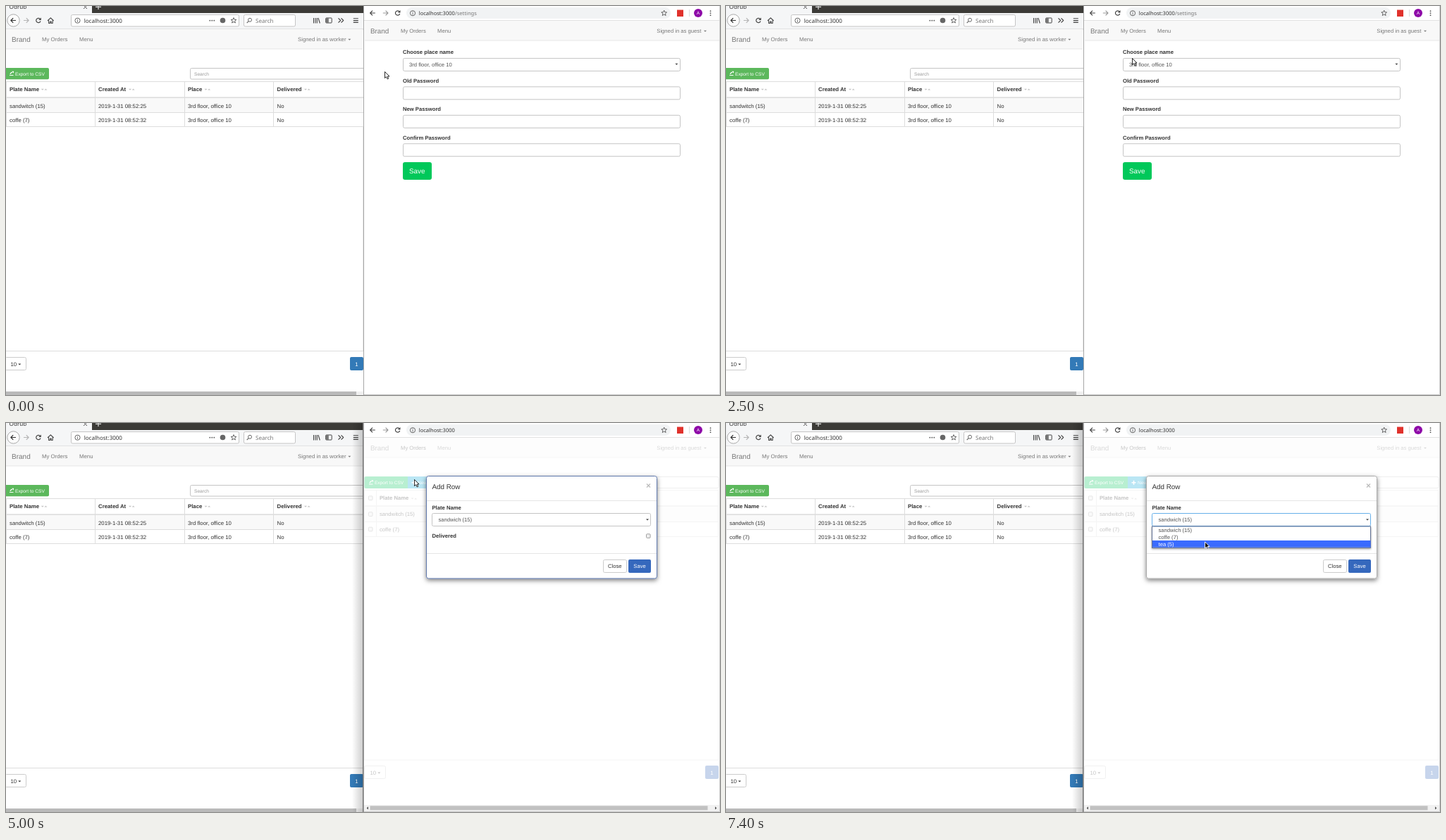
Write an HTML page that moves like this. It is 1013 by 553 pixels and loops after 8 s.

```html
<!DOCTYPE html>
<html lang="en">
<head>
<meta charset="utf-8">
<title>Orders</title>
<style>
html, body { margin: 0; width: 100%; height: 100%; overflow: hidden; background: #fff; }
svg { display: block; width: 100vw; height: 100vh; }
text { font-family: "Liberation Sans", Arial, sans-serif; text-rendering: geometricPrecision; white-space: pre; }
.ui { font-family: "Noto Sans", "Open Sans", sans-serif; }
.b { font-weight: bold; }
</style>
</head>
<body>
<svg id="stage" viewBox="0 0 1013 553" preserveAspectRatio="none"></svg>
<script>
const LEFT = 7.8, RIGHT = 7.66, SMALL = 6.6, BIG = 9.85;
const INK = '#333', MUTED = '#777', LINE = '#ddd', FIELD = '#c4c4c4';

const text = (x, y, s, size, fill = INK, cls = '') =>
  `<text x="${x}" y="${y}" font-size="${size}" fill="${fill}" class="${cls}">${s}</text>`;
const rect = (x, y, w, h, fill, stroke = 'none', r = 0) =>
  `<rect x="${x}" y="${y}" width="${w}" height="${h}" rx="${r}" fill="${fill}" stroke="${stroke}"/>`;
const path = (d, stroke, width = 1, fill = 'none') =>
  `<path d="${d}" stroke="${stroke}" stroke-width="${width}" fill="${fill}" stroke-linejoin="round"/>`;
const circle = (x, y, r, fill, stroke = 'none') =>
  `<circle cx="${x}" cy="${y}" r="${r}" fill="${fill}" stroke="${stroke}"/>`;
const hline = (x1, x2, y, color = LINE) => rect(x1, y, x2 - x1, 1, color);
const vline = (x, y1, y2, color = LINE) => rect(x, y1, 1, y2 - y1, color);
const group = (id, body, attrs = '') => `<g id="${id}" ${attrs}>${body}</g>`;

const caret = (x, y, color, w = 4) => path(`M${x} ${y}h${w}l${-w / 2} ${w / 2}z`, 'none', 0, color);
const sorter = (x, y) => caret(x, y - .6, '#c4c4c4') + path(`M${x + 4.6} ${y + 1.2}h4l-2 -2z`, 'none', 0, '#c4c4c4');
const field = (x, y, w, h) => rect(x, y, w, h, '#fff', FIELD, 2);
const checkbox = (x, y) => rect(x - 2.8, y - 2.8, 5.6, 5.6, '#eee', '#a2a2a2', 1);
const dots = (x, y, dx, dy, color) =>
  [-1, 0, 1].map(i => circle(x + i * dx, y + i * dy, .9, color)).join('');
const info = (x, y) => circle(x, y, 3.6, 'none', '#666') +
  path(`M${x} ${y - .5}v2.6M${x} ${y - 2.2}v1`, '#666', .9);
const arrow = (x, y, dir, color) =>
  path(`M${x - 3.5} ${y}h7M${x + dir * .3} ${y - 3.3}l${dir * 3.3} 3.3l${-dir * 3.3} 3.3`, color, 1.2);
const reload = (x, y, color) =>
  path(`M${x + 3} ${y + 1}a3.2 3.2 0 1 1 -.7 -3.2`, color, 1.2) +
  path(`M${x + 3.8} ${y - 4}v3.6h-3.6z`, 'none', 0, color);
const star = (x, y) => {
  const pts = Array.from({ length: 10 }, (_, i) => {
    const a = Math.PI * (i / 5 - .5), r = i % 2 ? 1.8 : 4.1;
    return `${(x + r * Math.cos(a)).toFixed(2)} ${(y + r * Math.sin(a)).toFixed(2)}`;
  });
  return path(`M${pts.join('L')}z`, '#555', .9);
};
const exportIcon = (x, y) =>
  path(`M${x} ${y + 2.3}h5.5M${x + 1} ${y + .8}q.6 -2.6 3 -2.6`, '#fff', 1.1) +
  path(`M${x + 3.3} ${y - 3.4}h2.7v2.9z`, 'none', 0, '#fff');
const pager = (x, y, end, color) =>
  rect(x - 1.5, y + .5, 30, 18, '#fff', '#ccc', 2) + text(x + 6.5, y + 12.6, '10', LEFT) +
  caret(x + 17.3, y + 9.4, INK) + rect(end - 19, y, 19, 19, color, 'none', 2) +
  text(end - 11.8, y + 12.6, '1', LEFT, '#fff');

function navBar(x, y, size, orders, menu, user, userX, caretX, bold) {
  const base = y + 17.2;
  return rect(x, y, 506, 28, '#f8f8f8') + hline(x, x + 506, y + 27.5, '#e7e7e7') +
    text(x + 8, base + .8, 'Brand', size * 1.286, MUTED) +
    text(orders, base, 'My Orders', size, bold || MUTED) + text(menu, base, 'Menu', size, MUTED) +
    text(userX, base, 'Signed in as ' + user, size, MUTED) + caret(caretX, base - 3.4, MUTED);
}

function leftWindow() {
  const cols = [5, 131, 258, 384.5];
  const heads = ['Plate Name', 'Created At', 'Place', 'Delivered'];
  const sorts = [49.8, 174, 281.5, 423];
  const rows = [['sandwitch (15)', '2019-1-31 08:52:25'], ['coffe (7)', '2019-1-31 08:52:32']];
  let s = rect(0, 0, 507, 553, '#fff') + rect(0, 0, 507, 10, '#3c3b37') +
    rect(0, 0, 122, 10, '#f5f6f7') + text(4.5, 4.3, 'Odrub', 8.2, INK, 'ui') +
    path('M110 -1l5 5m0 -5l-5 5', '#555', 1) + path('M127 1.3h8M131 -2v7', '#ddd', 1.2) +
    rect(0, 10, 507, 23, '#f5f6f7') + hline(0, 507, 32.5, '#d0d0d0');
  s += circle(10.5, 20.5, 8.7, '#fbfbfb', '#aaa') + arrow(10.5, 20.5, -1, '#333') +
    arrow(28.5, 20.5, 1, '#b5b5b5') + reload(46, 20.5, '#444') +
    path('M59 21l4.3 -4.2l4.3 4.2M60.6 20.5v4h2v-2.5h1.5v2.5h2v-4', '#444', 1.1) +
    rect(92.5, 12.5, 238, 16.5, '#fff', '#c5c5c5', 2) + info(101.5, 20.7) +
    text(110.7, 23.7, 'localhost:3000', 8, INK, 'ui') + dots(292.3, 20.7, 3, 0, '#555') +
    circle(307.5, 20.5, 3.8, '#666') + star(323, 20.7) +
    rect(337.5, 12.5, 73, 16.5, '#fff', '#c5c5c5', 2) + circle(346, 19.8, 2.5, 'none', '#666') +
    path('M344.2 21.6l-2.5 2.6', '#666', 1.2) + text(354, 23.7, 'Search', 8.1, MUTED, 'ui') +
    path('M436.5 17v7.5M439 17v7.5M441.3 17v7.5M443 17l2.3 7.5', '#444', 1.1) +
    rect(453.7, 17, 8.5, 7, 'none', '#444', 1) + rect(454, 17, 3.8, 7, '#777') +
    path('M471.5 17.3l3.2 3.2l-3.2 3.2m4 -6.4l3.2 3.2l-3.2 3.2', '#444', 1.2) +
    path('M492.8 17.8h7M492.8 20.6h7M492.8 23.4h7', '#444', 1.1);
  s += navBar(0, 33, LEFT, 51, 104, 'worker', 414, 485.3);
  s += rect(-3, 88, 64, 16.3, '#5cb85c', 'none', 2) + exportIcon(5, 96.2) +
    text(13, 98.8, 'Export to CSV', SMALL, '#fff') +
    rect(261.5, 88.5, 248, 15.5, '#fff', FIELD, 2) + text(267, 98.8, 'Search', SMALL, '#999');
  s += rect(0, 131, 507, 20, '#f9f9f9') + hline(0, 507, 107, LINE) + rect(0, 129.3, 507, 1.6, LINE) +
    hline(0, 507, 151) + hline(0, 507, 171) + vline(0, 107, 172) +
    [126, 253, 379].map(x => vline(x, 107, 172)).join('');
  heads.forEach((h, i) => s += text(cols[i], 120.7, h, LEFT, INK, 'b') + sorter(sorts[i], 118.4));
  rows.forEach((r, j) => [...r, '3rd floor, office 10', 'No'].forEach((c, i) =>
    s += text(cols[i], 144.7 + j * 20.2, c, LEFT)));
  s += hline(0, 507, 490) + vline(506, 171, 490, '#e6e6e6') + pager(0, 499, 507, '#337ab7') +
    rect(0, 548, 507, 5, '#f0f0f0') + rect(0, 548, 497, 5, '#bababa');
  return s;
}

function rightChrome() {
  return rect(508, 0, 505, 553, '#fff') + arrow(520.3, 10, -1, '#444') + arrow(538.3, 10, 1, '#999') +
    reload(555.7, 10, '#444') + rect(568, 2, 375, 16, '#f1f3f4', 'none', 8) + info(577, 10.2) +
    text(585.7, 12.9, 'localhost:3000<tspan id="route" fill="#777">/settings</tspan>', 7.55, INK, 'ui') +
    star(933.7, 10.2) + rect(952, 5.5, 9, 9.5, '#e0322c') + vline(969, 5, 15, '#ddd') +
    circle(982, 10, 6, '#8e0aa8') + text(979.9, 12.2, 'A', 6.2, '#fff') + dots(999.5, 10.2, 0, 3, '#555') +
    hline(508, 1013, 20, '#e2e2e2');
}

function settingsPage() {
  let s = navBar(509, 21, RIGHT, 560, 612, 'guest', 923.3, 990);
  ['Choose place name', 'Old Password', 'New Password', 'Confirm Password'].forEach((label, i) => {
    const y = 68.2 + i * 40.45;
    s += text(563, y, label, RIGHT, INK, 'b') + field(563.5, y + 6.2, 393, 18);
  });
  return s + text(572, 85.9, '3rd floor, office 10', RIGHT, '#555') + caret(949.4, 81.7, INK) +
    rect(563, 222, 41, 25, '#00c85a', 'none', 3) + text(572, 238, 'Save', BIG, '#fff') +
    hline(508, 1013, 552, '#c8c8c8');
}

function ordersPage() {
  const cols = [530, 692, 854];
  let s = navBar(509, 21, RIGHT, 560, 612, 'guest', 923.3, 990, INK);
  s += rect(508.5, 76, 63, 17, '#00c85a', 'none', 2) + exportIcon(515, 84.7) +
    text(523, 87.2, 'Export to CSV', 6.5, '#fff') +
    `<rect id="newBtn" x="570" y="76" width="34" height="17"/>` +
    path('M575.5 84.7h6M578.5 81.7v6', '#fff', 1.6) + text(584, 87.2, 'New', 6.5, '#fff') +
    rect(603.5, 76, 39, 17, '#f9ad3d', 'none', 2) +
    path('M609.5 82.2h5.5M611.2 82v-1.2h2v1.2M610.3 83v4.8h4v-4.8M612.3 83.5v3.5', '#fff', .9) +
    text(616.5, 87.2, 'Delete', 6.5, '#fff') +
    rect(768.5, 76.5, 242.5, 16, '#fff', FIELD, 2) + text(774, 87.2, 'Search', SMALL, '#999');
  s += rect(509, 119, 502, 21, '#f9f9f9') + hline(508, 1011, 95) + rect(508, 117.2, 503, 1.6, LINE) +
    hline(508, 1011, 140) + hline(508, 1011, 161) +
    [508, 525, 687, 849, 1010].map(x => vline(x, 95, 162)).join('') +
    [106.7, 129.6, 151].map(y => checkbox(517.2, y)).join('');
  ['Plate Name', 'Created At', 'Delivered'].forEach((h, i) =>
    s += text(cols[i], 109.3, h, RIGHT, INK, 'b') + sorter([574.5, 734, 891.5][i], 107.2));
  [['sandwitch (15)', '2019-1-31 08:52:25', 'No'], ['coffe (7)', '2019-1-31 08:52:32', 'No']]
    .forEach((r, j) => r.forEach((c, i) => s += text(cols[i], 132.2 + j * 21.3, c, RIGHT)));
  return s + vline(508, 161, 479, '#e6e6e6') + vline(1010, 161, 479, '#e6e6e6') + hline(508, 1011, 478.5) +
    pager(510, 487, 1011, '#3568bd');
}

function modal() {
  return rect(508, 21, 505, 521, 'rgba(255,255,255,.72)') +
    `<rect id="frame" x="596.5" y="75.5" width="327" height="145.5" rx="3" fill="#fff" filter="url(#drop)"/>` +
    text(604.5, 94, 'Add Row', BIG) + text(908, 92.9, '×', 12, '#bbb', 'b') +
    hline(597, 923, 110, '#e5e5e5') + text(604.5, 123, 'Plate Name', RIGHT, INK, 'b') +
    `<rect id="select" x="604.5" y="128.5" width="310" height="18" rx="2" fill="#fff"/>` +
    text(613.5, 140.4, 'sandwich (15)', RIGHT, '#555') + caret(908, 136.5, INK) +
    text(604.5, 163.3, 'Delivered', RIGHT, INK, 'b') + checkbox(911.3, 160.6) +
    hline(597, 923, 185, '#e5e5e5') + rect(847.5, 194.5, 33, 18, '#fff', '#ccc', 2) +
    text(854, 206.2, 'Close', RIGHT) + rect(883, 194, 32, 19, '#3568bd', 'none', 2) +
    text(890.3, 206.2, 'Save', RIGHT, '#fff');
}

const options = ['sandwich (15)', 'coffe (7)', 'tea (5)'];
const dropdown = () =>
  `<rect x="604.5" y="147" width="310" height="30.5" fill="#fff" stroke="#52658c" stroke-width=".9" filter="url(#soft)"/>` +
  `<rect id="pick" x="605" width="309.5" height="9.8" fill="#3a6bff"/>` +
  options.map((o, i) => `<g class="opt">${text(613.5, 154.9 + i * 9.85, o, RIGHT, 'inherit')}</g>`).join('');

const scrollbar = rect(508, 543, 505, 9, '#f1f1f1') + rect(516.5, 544.3, 479, 6, '#c1c1c1') +
  path('M514 545.2v4.4l-2.4 -2.2z', 'none', 0, '#555') + path('M1006 545.2v4.4l2.4 -2.2z', 'none', 0, '#555') +
  hline(508, 1013, 552, '#c8c8c8');
const status = rect(508, 540, 166, 13, '#f7f7f7') + text(511.5, 549, 'localhost:3000', 7.4, '#555', 'ui');
const pointer = '<path id="arrow" d="M.5 .4V9.5L2.7 7.6L4.2 10.9L5.7 10.2L4.3 7H7Z" stroke-width=".9" stroke-linejoin="round"/>';
const hand = path('M1.7 1.2q1.2 -1.2 1.8 .2v3l3.9 .8q1.4 .4 1.2 1.8l-.8 3.8h-4.8l-2.9 -3.9q.3 -1.4 1.6 -.5z',
  '#111', .9, '#fff');

const stage = document.getElementById('stage');
stage.innerHTML = `<defs>
  <filter id="drop" x="-10%" y="-10%" width="120%" height="130%"><feDropShadow dx="0" dy="2.5" stdDeviation="3" flood-opacity=".5"/></filter>
  <filter id="soft" x="-5%" y="-20%" width="110%" height="160%"><feDropShadow dx="0" dy="1.2" stdDeviation="1.5" flood-opacity=".4"/></filter>
  <linearGradient id="fade"><stop offset="0" stop-opacity="0"/><stop offset="1" stop-opacity=".2"/></linearGradient>
  </defs>` + leftWindow() +
  group('shade', rect(491, 0, 16, 553, 'url(#fade)') + vline(506, 0, 553, '#777')) +
  vline(507, 0, 553, '#a6a6a6') + rightChrome() +
  group('settings', settingsPage()) + group('orders', ordersPage()) +
  group('modal', modal()) + group('menu', dropdown()) +
  group('scroll', scrollbar) + group('status', status) + vline(1012, 0, 553, '#d0d0d0') +
  group('cursor', pointer + group('hand', hand));

const el = id => document.getElementById(id);
const show = (id, on) => el(id).setAttribute('display', on ? 'inline' : 'none');
const opts = document.querySelectorAll('.opt');

// Pointer samples: time, x, y; each one holds until the next.
const trail = [
  [0, 537, 93], [200, 588, 62], [300, 662, 31], [400, 743, 46], [500, 736, 82], [600, 694, 104],
  [700, 642, 113], [800, 598, 117], [900, 571, 118], [1000, 568, 112],
  [1100, 566, 98], [1200, 573, 68], [1300, 600, 42], [1400, 641, 32], [1500, 675, 48],
  [1600, 683, 80], [1700, 678, 106], [1800, 662, 122], [1900, 642, 118], [2000, 591, 133],
  [2400, 584, 102], [2500, 576, 74], [3300, 578, 37], [3800, 619, 57], [4100, 576, 80],
  [5000, 579, 80], [5200, 620, 110], [5400, 646, 129], [5700, 746, 173], [5900, 743.5, 153],
  [6300, 733, 143], [6600, 733, 142], [6900, 706, 151], [7100, 692, 163], [7400, 679, 168.5]
];

function draw(t) {
  const within = (a, b) => t >= a && t < b;
  const orders = t >= 3300, adding = t >= 5000, open = t >= 6900;
  show('shade', orders);
  show('settings', !orders);
  show('orders', orders);
  show('scroll', orders);
  show('route', !orders);
  show('status', within(3600, 3800));
  show('modal', adding);
  show('menu', open);
  el('newBtn').setAttribute('fill', t >= 4100 ? '#08a5d8' : '#33b5e5');
  el('frame').setAttribute('stroke', open ? '#aaa' : '#5f78ad');
  el('select').setAttribute('stroke', open ? '#66afe9' : FIELD);

  const chosen = t < 7100 ? 0 : t < 7400 ? 1 : 2;
  el('pick').setAttribute('y', 147.3 + chosen * 9.85);
  opts.forEach((o, i) => o.firstChild.setAttribute('fill', i === chosen ? '#fff' : '#555'));

  const [, x, y] = trail.findLast(p => p[0] <= t);
  const pointing = within(3300, 3800) || within(4100, 5000);
  el('cursor').setAttribute('transform', `translate(${x} ${y})`);
  show('hand', pointing);
  show('arrow', !pointing);
  el('arrow').setAttribute('fill', open ? '#111' : '#fff');
  el('arrow').setAttribute('stroke', open ? '#fff' : '#111');
}

function tick() {
  draw(performance.now() % 8000);
  requestAnimationFrame(tick);
}
tick();
</script>
</body>
</html>
```
